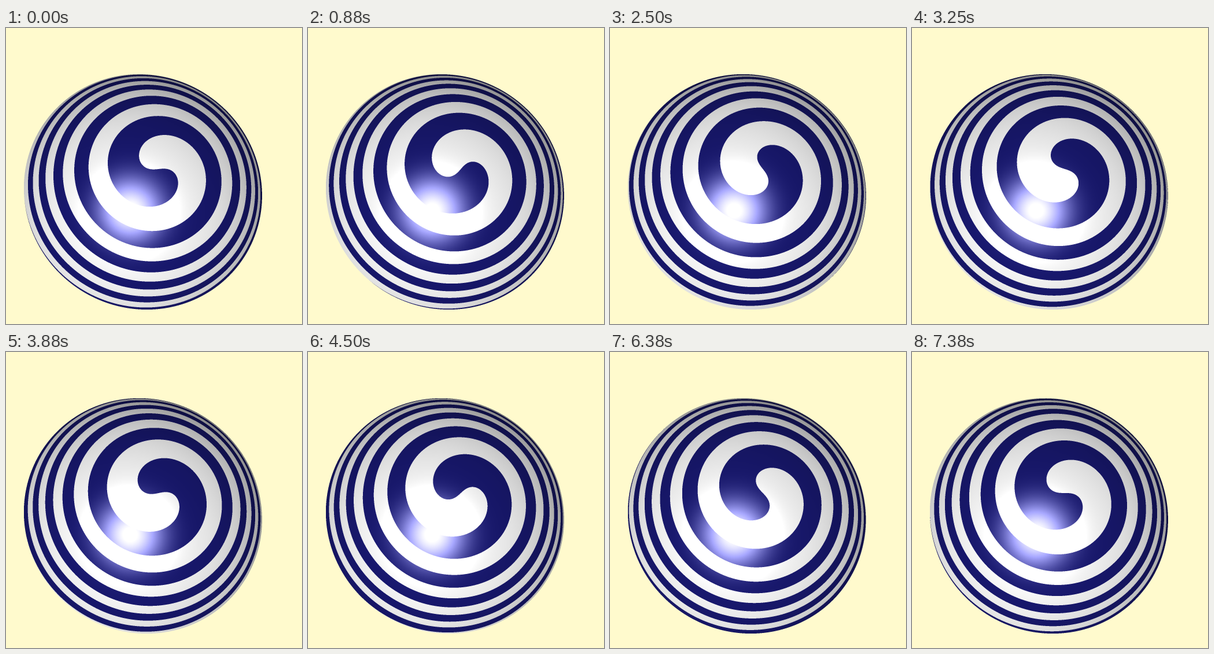
These frames come from a looping animation (512x512 px, 7500 ms). An HTML page with a canvas:

```html
<!DOCTYPE html>
<html lang="en">
<head>
<meta charset="utf-8">
<title>Spiral dome</title>
<style>
html, body { margin: 0; width: 100%; height: 100%; overflow: hidden; background: #fffacd; }
canvas { display: block; width: 100vw; height: 100vh; }
</style>
</head>
<body>
<canvas id="stage" width="512" height="512"></canvas>
<script>
const SIZE = 512, SUB = 3, SAMPLES = SUB * SUB;
const LOOP = 7500, STEPS = 60;
const BACK = [255, 250, 205], WHITE = [255, 255, 255], BLUE = [25, 25, 114];

// Camera: looks at a point on the dome axis, tilted away from it.
// Axis frame: e (lean direction), t (sideways), a (along the axis).
const FOCAL = 935.4, LOOK = 0.8146, DIST = 3.5627, RIM = 0.5192;
const SIN = 0.287, COS = Math.sqrt(1 - SIN * SIN);
const UX = 0.5707, UY = -0.8211;
const EYE = [-DIST * SIN, 0, LOOK + DIST * COS];
const LIGHT = [-0.408, 0, 0.913];
const HALF_TURNS = 10, START = 48 / 180;

const dot = (p, q) => p[0] * q[0] + p[1] * q[1] + p[2] * q[2];

// Point of the unit dome seen through a stage position, or null.
function cast(x, y) {
  const dx = (x - SIZE / 2) / FOCAL, dy = (y - SIZE / 2) / FOCAL;
  const s = dx * UX + dy * UY, t = dy * UX - dx * UY;
  const ray = [s * COS + SIN, t, s * SIN - COS];
  const len = Math.hypot(...ray);
  const dir = ray.map(v => v / len);
  const b = dot(EYE, dir);
  const disc = b * b - dot(EYE, EYE) + 1;
  if (disc < 0) return null;
  const far = -b - Math.sqrt(disc);
  const hit = EYE.map((v, i) => v + far * dir[i]);
  return hit[2] < RIM ? null : { hit, dir };
}

function shade({ hit, dir }) {
  const facing = dot(hit, LIGHT);
  const mirror = LIGHT.map((v, i) => 2 * facing * hit[i] - v);
  const glint = Math.max(0, -dot(mirror, dir));
  return [0.38 + 0.61 * Math.max(0, facing), 0.95 * 255 * glint ** 10];
}

// Each half turn of the spiral descends the same height.
function spiral([e, t, a]) {
  return HALF_TURNS * (1 - a) / (1 - RIM) - Math.atan2(t, e) / Math.PI + 4;
}

const cells = [], phases = [];
for (let y = 78; y < 490; y++) {
  for (let x = 28; x < 447; x++) {
    let first = null, hits = 0;
    const start = phases.length;
    for (let i = 0; i < SAMPLES; i++) {
      const point = cast(x + (i % SUB + 0.5) / SUB, y + (Math.floor(i / SUB) + 0.5) / SUB);
      if (!point) continue;
      first = first || point;
      hits++;
      phases.push(spiral(point.hit));
    }
    if (!hits) continue;
    const [lit, gloss] = shade(first);
    const tint = base => base.map(v => Math.min(255, v * lit + gloss));
    cells.push({ at: 4 * (y * SIZE + x), start, hits, white: tint(WHITE), blue: tint(BLUE) });
  }
}
const phase = Float32Array.from(phases);

const ctx = document.getElementById("stage").getContext("2d");
ctx.fillStyle = `rgb(${BACK})`;
ctx.fillRect(0, 0, SIZE, SIZE);
const image = ctx.getImageData(0, 0, SIZE, SIZE);

function draw(step) {
  const turn = START - 2 * step / STEPS;
  const px = image.data;
  for (const { at, start, hits, white, blue } of cells) {
    let light = 0;
    for (let i = start; i < start + hits; i++) light += 1 - ((phase[i] + turn) & 1);
    for (let c = 0; c < 3; c++) {
      px[at + c] = (white[c] * light + blue[c] * (hits - light) + BACK[c] * (SAMPLES - hits)) / SAMPLES;
    }
  }
  ctx.putImageData(image, 0, 0);
}

// Steps begin on whole hundredths of a second.
function stepAt(time) {
  const step = Math.floor(time * STEPS / LOOP);
  return time < Math.round(step * 12.5) * 10 ? step - 1 : step;
}

let shown = -1, origin = null;
function tick(now) {
  if (origin === null) origin = now;
  const step = stepAt((now - origin) % LOOP);
  if (step !== shown) draw(shown = step);
  requestAnimationFrame(tick);
}
draw(0);
requestAnimationFrame(tick);
</script>
</body>
</html>
```
